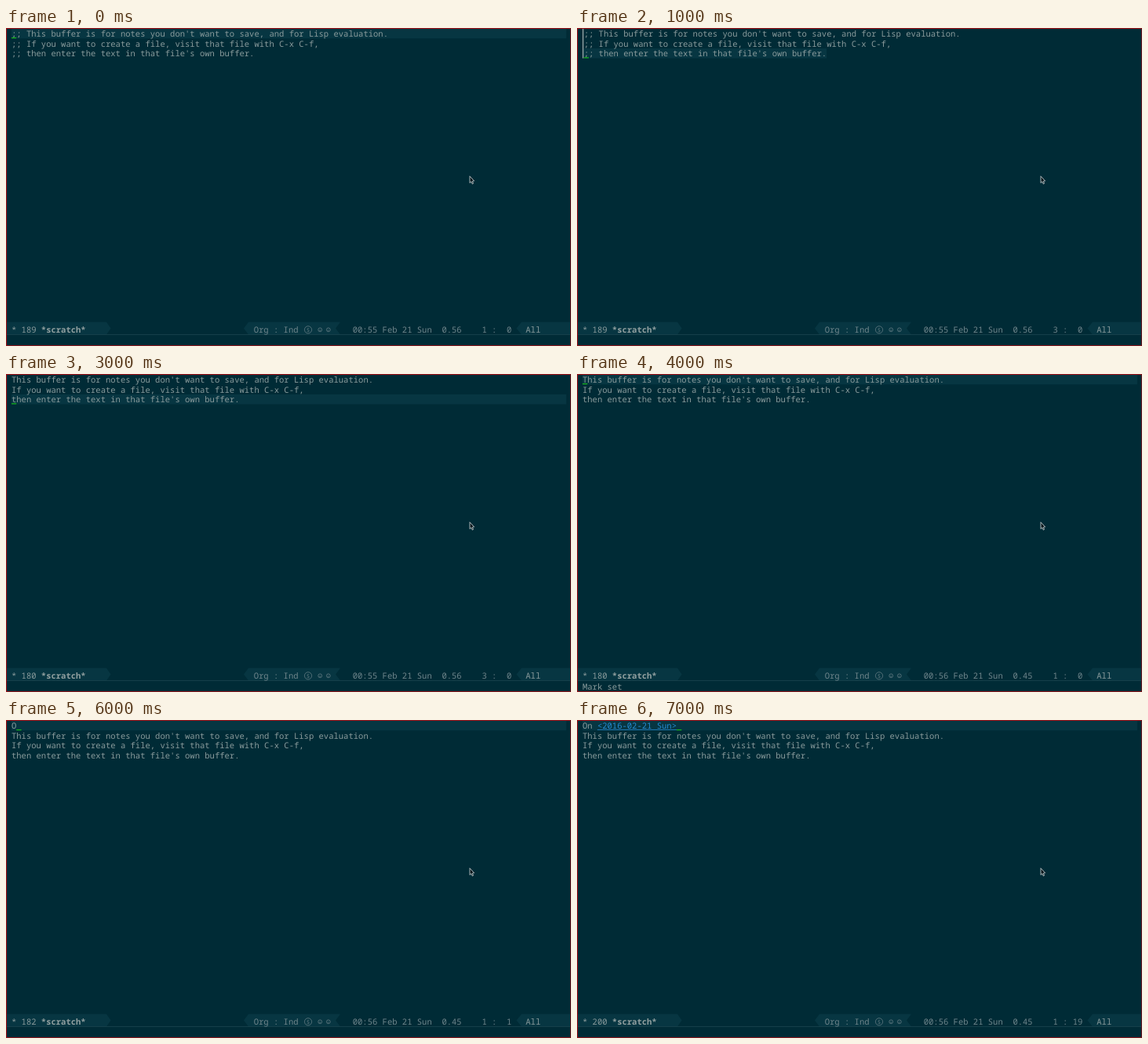
An HTML page with a canvas for the animation above (8000 ms loop, 720 by 405 pixels).

```html
<!DOCTYPE html>
<html lang="en">
<head>
<meta charset="utf-8">
<title>Scratch buffer</title>
<style>
  html, body { margin: 0; width: 100%; height: 100%; overflow: hidden; background: #002b36; }
  canvas { display: block; }
</style>
</head>
<body>
<canvas id="stage" width="720" height="405"></canvas>
<script>
const ctx = document.getElementById('stage').getContext('2d');
const CELL = 6.316, ROW = 12.632, LEFT = 6.95, TOP = 0.65;
const BASE = '#002b36', RAISED = '#073642', TEXT = '#8a9b9c', BRIGHT = '#93a1a1',
      DIM = '#6f858b', GREEN = '#16b01c', BLUE = '#268bd2';
const FONT = '10.53px "Noto Sans Mono", "DejaVu Sans Mono", monospace';

const NOTES = [
  "This buffer is for notes you don't want to save, and for Lisp evaluation.",
  'If you want to create a file, visit that file with C-x C-f,',
  "then enter the text in that file's own buffer."
];
const COMMENTED = NOTES.map(line => ';; ' + line);
const EARLY = '00:55 Feb 21 Sun  0.56', LATE = '00:56 Feb 21 Sun  0.45';
const STAMP = '<2016-02-21 Sun>';

// One editor state per second; region is a rectangle width in columns.
const STATES = [
  { lines: COMMENTED, row: 0, col: 0, size: 189, clock: EARLY },
  { lines: COMMENTED, row: 2, col: 0, size: 189, clock: EARLY, region: 0 },
  { lines: COMMENTED, row: 2, col: 3, size: 189, clock: EARLY, region: 3 },
  { lines: NOTES, row: 2, col: 0, size: 180, clock: EARLY },
  { lines: NOTES, row: 0, col: 0, size: 180, clock: LATE, echo: 'Mark set' },
  { lines: ['', ...NOTES], row: 0, col: 0, size: 181, clock: LATE },
  { lines: ['O', ...NOTES], row: 0, col: 1, size: 182, clock: LATE },
  { lines: ['On ', ...NOTES], row: 0, col: 19, size: 200, clock: LATE, stamp: true }
];

function rect(x, y, w, h, color) {
  ctx.fillStyle = color;
  ctx.fillRect(x, y, w, h);
}

function polygon(points, color) {
  ctx.beginPath();
  points.forEach(([x, y]) => ctx.lineTo(x, y));
  ctx.closePath();
  ctx.fillStyle = color;
  ctx.fill();
}

// Text sits on the editor's fixed character grid.
function print(text, x, baseline, color, weight = '') {
  ctx.font = `${weight} ${FONT}`;
  ctx.textAlign = 'left';
  ctx.fillStyle = color;
  [...text].forEach((char, i) => {
    if (char !== ' ') ctx.fillText(char, x + i * CELL, baseline);
  });
}

function drawBuffer({ lines, row, col, region, stamp }) {
  const selecting = region !== undefined;
  const shift = region === 0 ? 1.7 : 0;
  const x = LEFT + shift;
  const rowTop = TOP + row * ROW;
  const hlWidth = selecting ? lines[row].length * CELL + shift : 707;
  rect(LEFT, rowTop, hlWidth, ROW, RAISED);
  if (selecting) {
    rect(LEFT, TOP, region * CELL || 1.4, ROW * lines.length, BRIGHT);
  }

  lines.forEach((line, i) => {
    const baseline = TOP + i * ROW + 10.35;
    const marked = region || 0;
    print(line.slice(0, marked), x, baseline, BASE);
    print(line.slice(marked), x + marked * CELL, baseline, TEXT);
  });

  if (stamp) {
    const stampX = LEFT + 3 * CELL;
    print(STAMP, stampX, TOP + 10.35, BLUE);
    rect(stampX, TOP + 11.3, STAMP.length * CELL, 0.8, BLUE);
  }
  rect(x + col * CELL, rowTop + 11.3, CELL, 1.3, GREEN);
}

function badge(x, radius, letter) {
  ctx.strokeStyle = ctx.fillStyle = DIM;
  ctx.lineWidth = 0.7;
  ctx.beginPath();
  ctx.arc(x, 384.3, radius, 0, Math.PI * 2);
  ctx.stroke();
  ctx.font = `${radius * 1.4}px "Noto Sans Mono", monospace`;
  ctx.textAlign = 'center';
  ctx.fillText(letter, x, 384.3 + radius * 0.5);
}

function drawModeline({ row, col, size, clock, echo }) {
  const top = 374.5, mid = 382.5, bottom = 390.5, baseline = 387.8;
  polygon([[0, top], [128, top], [133.5, mid], [128, bottom], [0, bottom]], RAISED);
  polygon([[309, top], [426, top], [420, mid], [426, bottom], [309, bottom], [303, mid]], RAISED);
  polygon([[657, top], [720, top], [720, bottom], [657, bottom], [650.5, mid]], RAISED);
  rect(0, 390, 720, 0.8, '#1b444e');

  print(`* ${size}`, LEFT, baseline, TEXT);
  print('*scratch*', LEFT + 6 * CELL, baseline, BRIGHT, 'bold');
  print('Org : Ind', 315.7, baseline, DIM);
  badge(385, 4.6, 'S');
  badge(400.2, 2.4, 'o');
  badge(410.8, 2.4, 'i');
  print(clock, 441.7, baseline, DIM);
  print(`${row + 1} : ${String(col).padStart(2)}`, 606.4, baseline, DIM);
  print('All', 662.3, baseline, TEXT);
  if (echo) print(echo, LEFT, 402.2, TEXT);
}

function drawPointer() {
  polygon([[591, 188.7], [591, 197.3], [592.9, 195.6], [594.2, 198.6],
           [595.5, 198], [594.3, 195.1], [596.6, 194.8]], '#06181d');
  ctx.strokeStyle = '#d5dadb';
  ctx.lineWidth = 0.8;
  ctx.stroke();
}

function drawBorder() {
  rect(0, 0, 720, 1, '#a41318');
  rect(0, 404, 720, 1, '#8c171c');
  rect(0, 0, 1, 405, '#a41318');
  rect(719, 0, 1, 405, '#6c1a20');
}

function draw(time) {
  const state = STATES[Math.floor(time / 1000) % STATES.length];
  rect(0, 0, 720, 405, BASE);
  ctx.textRendering = 'geometricPrecision';
  drawBuffer(state);
  drawModeline(state);
  drawPointer();
  drawBorder();
}

const start = performance.now();
function tick() {
  draw(performance.now() - start);
  requestAnimationFrame(tick);
}
tick();
</script>
</body>
</html>
```
